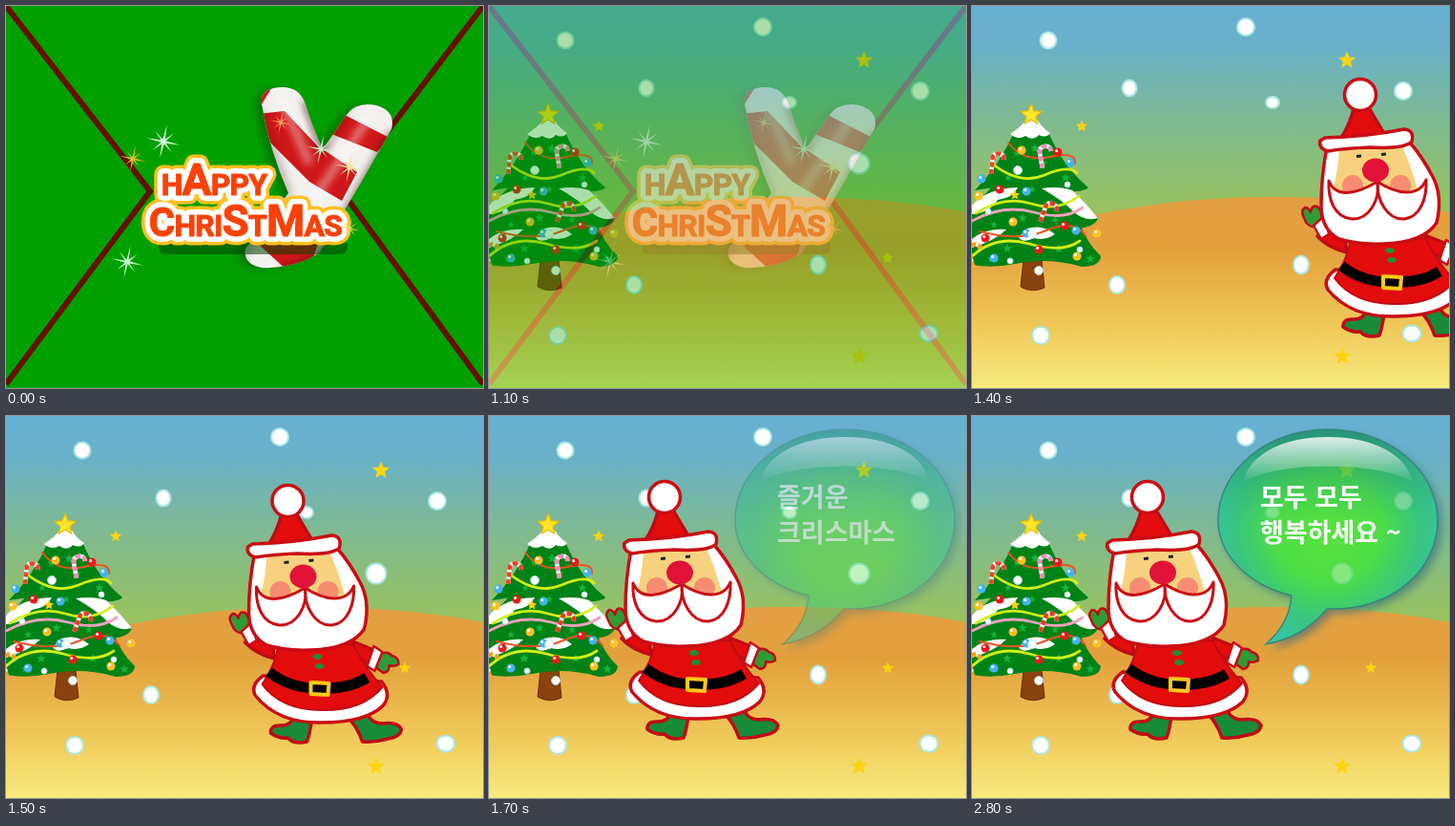
These frames come from a looping animation (500x400 px, 3.8 s). An HTML page:

```html
<!DOCTYPE html>
<html lang="ko">
<meta charset="utf-8">
<title>Happy Christmas</title>
<style>
  html, body { margin: 0; width: 100%; height: 100%; overflow: hidden; background: #00a000; }
  svg { display: block; width: 100%; height: 100%; }
  .logo { font: 700 32px Roboto, sans-serif; letter-spacing: -.8px; text-anchor: middle; stroke-linejoin: round; }
  .logo .big { font-size: 46px; }
  .logo .mid { font-size: 42px; }
  .speech { font: 700 27px "Noto Sans CJK KR", "Noto Sans CJK", sans-serif; fill: #fff; }
  .suit { fill: #e30c0c; stroke: #bf0a14; }
  .fur { fill: #fff; stroke: #c90d14; }
  .mitten { fill: #2f9b35; stroke: #bf0a14; }
  .boot { fill: #188b38; stroke: #bf0a14; }
</style>
<svg viewBox="0 0 500 400">
  <defs>
    <linearGradient id="sky" x2="0" y2="1">
      <stop stop-color="#68b0d4"/><stop offset=".2" stop-color="#69b1c8"/>
      <stop offset=".55" stop-color="#7fba91"/><stop offset="1" stop-color="#9bc45c"/>
    </linearGradient>
    <linearGradient id="ground" x2="0" y2="1">
      <stop stop-color="#e2a043"/><stop offset=".28" stop-color="#e3a13d"/>
      <stop offset=".65" stop-color="#efc657"/><stop offset="1" stop-color="#f8eb7e"/>
    </linearGradient>
    <radialGradient id="bubbleFill" gradientUnits="userSpaceOnUse" cx="373" cy="117" r="122">
      <stop stop-color="#58e33c"/><stop offset=".45" stop-color="#4ede45"/>
      <stop offset=".8" stop-color="#39c481"/><stop offset="1" stop-color="#38c5a0"/>
    </radialGradient>
    <linearGradient id="bubbleTop" x2="0" y2="1">
      <stop stop-color="#238276" stop-opacity=".75"/><stop offset=".45" stop-color="#30b070" stop-opacity="0"/>
    </linearGradient>
    <linearGradient id="shine" x2="0" y2="1">
      <stop stop-color="#fff" stop-opacity=".85"/><stop offset="1" stop-color="#fff" stop-opacity="0"/>
    </linearGradient>
    <filter id="soft" x="-30%" y="-30%" width="160%" height="160%"><feGaussianBlur stdDeviation="4"/></filter>
    <path id="cane" d="M268 103Q266 85 290 85Q308 85 314 103Q321 126 332 150L357 114Q367 100 388 104Q409 110 404 129L372 185L328 259Q298 276 268 274Q248 270 251 254L296 196Q276 150 268 103Z"/>
    <clipPath id="caneClip"><use href="#cane"/></clipPath>
    <path id="bubbleShape" d="M372 202C440 204 488 162 488 109C488 57 437 14 373 14S258 57 258 109C258 146 290 177 335 188Q333 217 308 239Q347 232 372 202Z"/>
  </defs>

  <g id="card">
    <path fill="#00a000" d="M0 0H500V400H0Z"/>
    <path d="M0 0L151 194L0 396M500 0L352 194L500 396" fill="none" stroke="#651000" stroke-width="6"/>
    <use href="#cane" x="-7" y="1" fill="#004800" opacity=".5" filter="url(#soft)"/>
    <g clip-path="url(#caneClip)">
      <path fill="#f3f1ef" d="M230 70H430V290H230Z"/>
      <path fill="#cf1618" d="M262 80H282L266 106ZM264 113L292 110L326 146L368 174L352 204L318 184L278 144ZM355 114L402 138L389 153L341 134ZM252 238L330 240L322 264L296 278Z"/>
      <g fill="none" filter="url(#soft)">
        <path d="M314 99L333 153M406 132L330 264L290 278" stroke="#300" stroke-width="8" opacity=".6"/>
        <path d="M266 110L296 196M357 112L335 150M296 196L248 262" stroke="#300" stroke-width="5" opacity=".4"/>
        <path d="M288 95L318 165M380 118L300 235" stroke="#fff" stroke-width="6" opacity=".6"/>
      </g>
    </g>
    <path d="M160 248H358V252Q358 260 350 260H168Q160 260 160 252Z" fill="#040" opacity=".55"/>
    <g id="logo"></g>
    <g id="sparkles"></g>
  </g>

  <g id="scene">
    <path fill="url(#sky)" d="M0 0H500V220H0Z"/>
    <path fill="url(#ground)" d="M0 255C90 221 200 200 310 200C390 200 450 206 500 216V400H0Z"/>
    <g id="tree">
      <path d="M54 266H73L76 295Q63 301 51 294Z" fill="#8a420e" stroke="#6a2c08"/>
      <path d="M14 225H112Q120 248 135 262Q134 273 115 273Q80 263 45 270Q20 275 0 271V242Z" fill="#008217"/>
      <path d="M22 188H100Q110 207 132 221Q130 234 100 233Q60 224 0 242V212Z" fill="#008217"/>
      <path d="M44 132H80Q95 168 122 190Q119 195 98 194Q60 183 3 193Q30 165 44 132Z" fill="#008217"/>
      <path d="M0 209Q15 191 48 190Q43 201 27 203Q17 217 0 218ZM73 191Q91 188 105 193Q119 206 132 222Q119 226 107 216Q96 204 73 191ZM0 244Q15 232 36 234Q24 246 0 253ZM58 233Q74 228 87 239Q77 246 65 243Q53 249 49 242Z" fill="#fff"/>
      <path d="M40 134Q53 125 56 120H69Q74 128 82 133Q78 139 70 135Q64 142 56 136Q48 141 40 134Z" fill="#fff"/>
      <g id="treeStars"></g>
      <g fill="none" stroke-width="2.8" stroke-linecap="round">
        <path d="M21 165Q50 188 76 177T110 175M4 217Q34 198 62 207T112 199M0 262Q25 239 60 249T113 246" stroke="#d2ef16"/>
        <path d="M38 143Q54 164 82 158T108 165M8 236Q50 247 78 235T119 240" stroke="#eb5525" stroke-width="2"/>
        <path d="M0 225Q33 207 65 216T116 211" stroke="#f3a1bc"/>
      </g>
      <g id="canes"></g>
      <g id="baubles"></g>
    </g>
    <g id="snow"></g>
    <g id="stars"></g>

    <g id="santa" stroke-width="3.5" stroke-linejoin="round">
      <path class="boot" d="M190 311L209 314Q207 329 204 337Q190 340 184 333Q174 334 166 328Q165 320 176 320Q187 321 190 311ZM248 313L268 309Q272 318 283 318Q299 316 303 324Q302 332 289 334Q275 338 262 337Q257 322 248 313Z"/>
      <path class="suit" d="M168 236L147 225L139 233Q150 245 170 250ZM252 232L279 243L272 257Q262 253 253 246Z"/>
      <path class="mitten" d="M139 224Q128 224 125 214Q121 207 126 203Q130 203 132 208Q133 200 139 202Q145 207 143 218Z" stroke-width="2.5"/>
      <path class="fur" d="M135 222L147 211L151 231L143 236Z" stroke-width="2.5"/>
      <path class="mitten" d="M279 246Q288 241 293 247Q301 249 300 256Q295 259 290 257Q291 264 284 265L277 260Z" stroke-width="2.5"/>
      <path class="fur" d="M274 237L283 243L275 263L267 258Z" stroke-width="2.5"/>
      <path class="fur" d="M158 268Q144 278 150 289Q174 318 219 317Q266 317 284 299Q293 287 282 274Z"/>
      <path class="suit" d="M174 236Q171 257 157 277Q177 304 219 304Q262 305 283 280Q265 260 252 235Z" stroke-width="2"/>
      <path d="M164 264Q187 282 219 281Q248 282 267 270" fill="none" stroke="#000" stroke-width="11"/>
      <path d="M208 275L227 276L226 288L208 287Z" fill="#000" stroke="#ffc918" stroke-width="4"/>
      <g fill="#238b32"><ellipse cx="215" cy="248" rx="5" ry="3"/><ellipse cx="217" cy="258" rx="5" ry="3"/></g>
      <path class="fur" d="M149 140Q143 170 143 203Q144 227 162 236Q180 242 208 241Q250 240 264 219Q271 190 259 169Q249 150 236 135Z"/>
      <path d="M162 140Q161 163 155 185Q175 203 203 178Q230 202 244 184Q236 155 226 135Z" fill="#f7d27e"/>
      <g fill="#f68d73"><circle cx="176" cy="180" r="11"/><circle cx="226" cy="180" r="11"/></g>
      <path class="fur" d="M202 176C205 195 193 216 175 215C157 213 150 195 151 175C158 193 178 190 202 176ZM202 176C201 195 212 216 230 215C247 213 254 193 253 174C245 193 222 189 202 176Z" stroke-width="3"/>
      <ellipse cx="200" cy="164" rx="14" ry="12.5" fill="#e01238"/>
      <path d="M180 149.5L185 149M206 147.5L211 147" fill="none" stroke="#222" stroke-width="3"/>
      <path class="suit" d="M178 95Q174 116 162 133H214Q203 116 191 95Z"/>
      <path class="fur" d="M147 130Q190 129 230 121Q241 122 238 134Q230 142 194 140Q167 141 150 144Q140 141 142 133Z"/>
      <circle class="fur" cx="184" cy="85" r="16.5"/>
    </g>

    <g id="bubble">
      <use href="#bubbleShape" x="5" y="5" fill="#27647e" opacity=".55" filter="url(#soft)"/>
      <use href="#bubbleShape" fill="url(#bubbleFill)"/>
      <use href="#bubbleShape" fill="url(#bubbleTop)" stroke="#37877e" stroke-width="1.5"/>
      <path d="M284 70C290 40 326 22 373 22S456 40 462 70C434 47 312 47 284 70Z" fill="url(#shine)"/>
      <g id="ghosts" opacity=".3"></g>
      <text class="speech"><tspan id="line1" x="302" y="95"></tspan><tspan id="line2" x="302" y="132"></tspan></text>
    </g>
  </g>
</svg>
<script>
const el = id => document.getElementById(id);
const clamp = (v, lo, hi) => Math.min(hi, Math.max(lo, v));
const fill = (id, items, draw) => el(id).innerHTML = items.map(item => draw(...item)).join('');

function star(x, y, r, color = '#fbd412', rays = 5, inner = 0.45) {
  const points = Array.from({ length: rays * 2 }, (_, i) => {
    const a = i * Math.PI / rays - Math.PI / 2, d = i % 2 ? r * inner : r;
    return `${(x + d * Math.cos(a)).toFixed(1)},${(y + d * Math.sin(a)).toFixed(1)}`;
  });
  return `<polygon points="${points.join(' ')}" fill="${color}"/>`;
}
const sparkle = (x, y, r, color) =>
  `<g transform="rotate(12 ${x} ${y})">${star(x, y, r, color, 4, .1)}</g>` +
  `<g transform="rotate(52 ${x} ${y})">${star(x, y, r * .8, color, 4, .1)}</g>`;
const flake = (x, y, rx, ry = rx) =>
  `<ellipse cx="${x}" cy="${y}" rx="${rx}" ry="${ry}" fill="#fff" stroke="#a9e7e5" stroke-width="${rx > 5 ? 2 : .8}"/>`;
const bauble = (x, y, color, r = 4.5) =>
  `<circle cx="${x}" cy="${y}" r="${r}" fill="${color}"/><circle cx="${x - 1.4}" cy="${y - 1.5}" r="1.5" fill="#fff"/>`;
const candy = (x, y, angle, color) => {
  const hook = 'd="M0 22V6Q0 0 6 0T12 6" fill="none"';
  return `<g transform="translate(${x} ${y}) rotate(${angle})"><path ${hook} stroke="#fff" stroke-width="4.5"/>
    <path ${hook} stroke="${color}" stroke-width="4.5" stroke-dasharray="5 2.5"/></g>`;
};

const letters = `<text x="218" y="198">H<tspan class="big">A</tspan>PPY</text>
  <text x="251" y="241"><tspan class="mid">C</tspan>HRI<tspan class="big">S</tspan>T<tspan class="big">M</tspan>AS</text>`;
fill('logo', [['#ffc020', 19], ['#fff', 12], ['#fa4208', 1]], (color, width) =>
  `<g class="logo" fill="${color}" stroke="${color}" stroke-width="${width}">${letters}</g>`);

fill('sparkles', [
  [165, 142, 18, '#d9ffe0'], [133, 160, 14, '#eac12a'], [330, 150, 15, '#c9f5cc'], [127, 268, 17, '#c5ffd0'],
  [360, 169, 16, '#ffe49a'], [288, 122, 12, '#f2a060'], [360, 233, 12, '#ffd35b'],
], sparkle);

fill('treeStars', [[66, 149, 5], [47, 154, 4], [74, 165, 5], [98, 180, 5], [38, 180, 4], [63, 192, 4],
  [53, 222, 5], [87, 224, 4], [23, 229, 4], [37, 254, 5], [91, 254, 5], [124, 265, 5], [20, 265, 4]],
  (x, y, r) => star(x, y, r, '#16b33c'));
fill('canes', [[22, 154, 5, '#e9432b'], [70, 148, -10, '#f08bb5'], [79, 205, 20, '#ec3923'], [-4, 251, -12, '#f2a114']], candy);

const red = '#e81a1a', blue = '#42b4ed', gold = '#ffc125';
fill('baubles', [[52, 151, gold], [90, 153, red], [103, 164, blue], [10, 181, blue], [29, 192, red], [57, 194, blue],
  [7, 199, gold], [43, 226, gold], [14, 243, red], [97, 230, red], [57, 238, blue], [70, 255, red],
  [109, 235, blue], [131, 238, gold], [110, 262, gold], [23, 264, blue]], bauble);

fill('snow', [[80, 36, 8.5], [287, 22, 9], [165, 86, 7.5, 8.5], [315, 101, 7, 6], [452, 89, 9],
  [388, 165, 10.5], [345, 271, 8, 9.5], [152, 292, 8, 9], [72, 345, 9], [461, 343, 9.5, 8.5],
  [48, 172, 4.5], [70, 277, 4.5], [63, 239, 4.5], [100, 187, 3], [17, 215, 3], [113, 255, 3], [40, 267, 3]], flake);
fill('stars', [[393, 57, 9.5], [115, 126, 6.5], [418, 264, 6.5], [388, 367, 9.5], [45, 198, 5.5],
  [62, 114, 13, '#f0b800'], [62, 114, 10, '#ffe62b']], star);
el('ghosts').innerHTML = star(393, 57, 9.5, '#c8dc10') + flake(452, 89, 9) + flake(388, 165, 10.5) + flake(315, 101, 7, 6);

function render(ms) {
  const tick = Math.floor(ms / 100);
  el('scene').setAttribute('opacity', clamp((tick - 9) / 3, 0, 1));

  const stepsLeft = clamp(16 - tick, 0, 5);
  el('santa').setAttribute('transform', `translate(${stepsLeft * 111.5} ${stepsLeft * 4})`);

  el('bubble').setAttribute('opacity', clamp((tick - 16) / 2, 0, 1));
  const [first, second] = ms < 2800 ? ['즐거운', '크리스마스'] : ['모두 모두', '행복하세요 ~'];
  el('line1').textContent = first;
  el('line2').textContent = second;
}

const start = performance.now();
(function frame() {
  render((performance.now() - start) % 3800);
  requestAnimationFrame(frame);
})();
</script>
</html>
```
